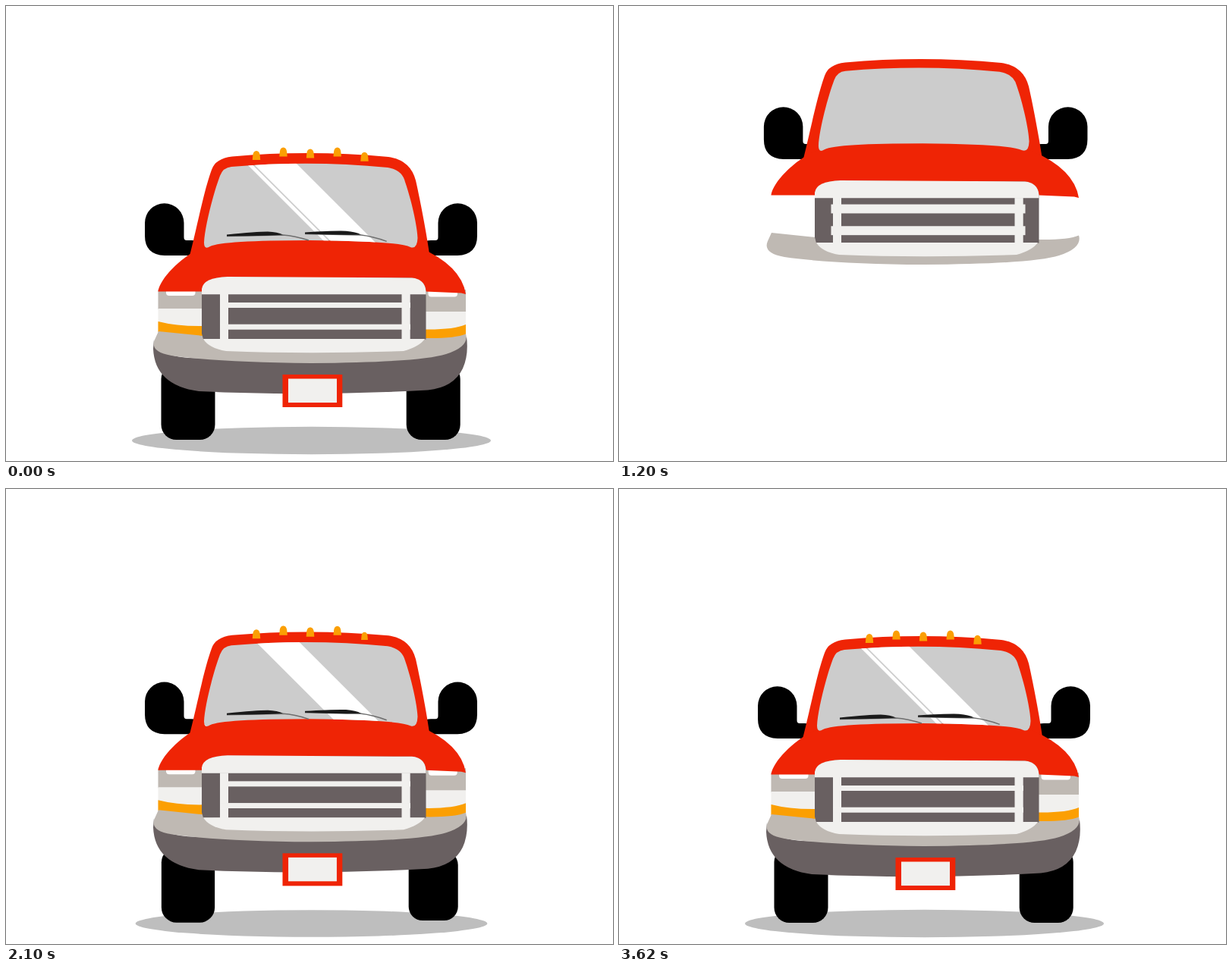
These frames come from a looping animation (800x600 px, 3.64 s). An HTML page without scripts:

```html
<!DOCTYPE html>
<html lang="en">
<head>
<meta charset="utf-8">
<title>Pickup truck</title>
<style>
html, body { margin: 0; width: 100%; height: 100%; overflow: hidden; background: #fff; }
svg { display: block; width: 800px; height: 600px; }

/* Every cycle starts 20 ms after load, so the finished truck shows first. */
svg [class] {
  animation: 3640ms ease-in-out -3620ms infinite;
  transform-box: fill-box;
  transform-origin: center;
}
svg .mid { animation-name: mid; animation-timing-function: step-end; }
svg .late { animation-name: late; animation-timing-function: step-end; }
svg .pop { animation-name: pop; animation-delay: calc(var(--s) * 1ms - 4368ms); }
svg .body { animation-name: drop, tilt; transform-box: view-box; transform-origin: 404px 510px; }
svg .shadow { animation-name: shadow; }
svg .wheel { animation-name: wheel; transform-origin: 50% 65%; }
svg .mirror { animation-name: mirror; }
svg .hood { animation-name: hood; }
svg .panel { animation-name: panel; }
svg .cab { animation-name: cab; }
svg .base { animation-name: base; }
svg .bar { animation-name: bar; }
svg .bumper { animation-name: bumper; }
svg .shine { animation-name: shine; }
svg .sliver { animation-name: sliver; }
svg .arm { animation-name: arm; }
svg .light { animation-name: light; animation-delay: calc(var(--i) * 60ms - 3620ms); transform-box: view-box; transform-origin: 0 0; }
svg .wheel.second { animation-delay: -3534ms; }
svg .mirror.second, svg .bar.second { animation-delay: -3520ms; }

@keyframes mid { 0% { visibility: hidden } 18.4%, 100% { visibility: visible } }
@keyframes late { 0% { visibility: hidden } 33.5%, 100% { visibility: visible } }
@keyframes pop { 0%, 20% { scale: 0 } 23% { scale: 1.1 } 26% { scale: .98 } 29%, 100% { scale: 1 } }
@keyframes drop {
  0%, 39% { translate: 0 -127px }
  45.8% { translate: 0 16.7px }
  54.7% { translate: 0 -7px }
  63.5% { translate: 0 1.2px }
  66.5% { translate: 0 1px }
  74%, 100% { translate: 0 0 }
}
@keyframes tilt {
  0%, 40% { rotate: 0deg }
  45.6% { rotate: -3deg }
  50.5% { rotate: .8deg }
  55%, 100% { rotate: 0deg }
}
@keyframes shadow {
  0%, 41.2% { scale: 0 }
  45.6% { scale: .99; animation-timing-function: ease-out }
  48.6% { scale: 1.085 }
  56.6% { scale: .98 }
  66.5% { scale: 1.003 }
  80%, 100% { scale: 1 }
}
@keyframes wheel {
  0%, 40.1% { scale: 0 }
  45.6% { scale: 1.57; animation-timing-function: ease-out }
  46.7% { scale: 1.65 }
  53.3% { scale: .88 }
  57.1% { scale: .99 }
  62.1% { scale: 1.02 }
  66.5%, 100% { scale: 1 }
}
@keyframes mirror {
  0%, 16% { scale: 0; translate: -84px 0 }
  19.8% { scale: 1.1; translate: -80px 0 }
  22% { scale: .98 }
  23.5% { scale: 1; translate: -80px 0 }
  31% { translate: 9px 0 }
  37.5% { translate: -2px 0 }
  42%, 100% { scale: 1; translate: 0 0 }
}
@keyframes hood { 0%, 4.4% { scale: 0 } 7.7% { scale: 1.02 } 10.5%, 100% { scale: 1 } }
@keyframes panel { 0%, 7.7% { scale: 0 } 11% { scale: 1.05 } 14%, 100% { scale: 1 } }
@keyframes cab {
  0%, 11% { scale: 0; translate: 0 -61px }
  14.6% { scale: 1.03 }
  18% { scale: 1 }
  21.5% { translate: 0 -61px }
  30.5% { translate: 0 5px }
  32.4% { translate: 0 3px }
  37%, 100% { scale: 1; translate: 0 0 }
}
@keyframes base {
  0%, 14.8% { scale: 0 1; translate: 0 19px }
  18.7% { scale: 1; translate: 0 0 }
  0%, 22% { d: path("M254 439H553Q553 449 553 457Q400 457 254 457Q254 448 254 439Z") }
  27%, 100% { d: path("M260 439H552Q545 449 524 455Q400 459.5 290 455Q267 451 260 439Z") }
  100% { scale: 1; translate: 0 0 }
}
@keyframes bar { 0%, 27.2% { scale: 0 } 29.7% { scale: 1.02 1.7 } 32.4%, 100% { scale: 1 } }
@keyframes bumper {
  0%, 25.8% { scale: 0; translate: 0 72px }
  28% { scale: .95 }
  32% { scale: 1; translate: 0 -3px }
  36.3%, 100% { scale: 1; translate: 0 0 }
}
@keyframes shine {
  0%, 39% { translate: -250px 0 }
  44.5% { translate: 22px 0 }
  57.1% { translate: 4px 0 }
  65%, 100% { translate: 0 0 }
}
@keyframes sliver { 0%, 57.7% { translate: -170px 0 } 64%, 100% { translate: 0 0 } }
@keyframes arm { 0%, 45.6% { stroke-width: 1.5px } 66.5%, 100% { stroke-width: 2.5px } }
@keyframes light {
  0%, 35.2% { scale: 0 }
  39% { scale: 1.75 }
  45.6% { scale: .9 }
  48.1% { scale: .8 }
  50.5% { scale: .85 }
  52.2% { scale: 1 }
  54.4% { scale: 1.03 }
  58.2%, 100% { scale: 1 }
}
</style>
</head>
<body>
<svg viewBox="0 0 800 600">
  <defs>
    <path id="glass" d="M261 312C262 290 274 245 282 224Q286 213 297 212Q400 203 503 213Q522 216 526 232C534 255 542 290 542.5 306Q542 321 533 318Q518 310 400 309Q285 309 269 317Q261 322 261 312Z"/>
    <clipPath id="pane"><use href="#glass"/></clipPath>
    <path id="mirror" d="M183 286A25.7 25.7 0 0 1 234.5 286V305Q234.5 309 238 309H244Q258 309 258 319T244 329H209Q183 328 183 303Z"/>
    <path id="lamp" d="M-5.2 0L-4.7 -6C-4.4 -10 -2.5 -12 0 -12S4.4 -10 4.7 -6L5.2 0Z"/>
    <g id="wiper">
      <path class="arm" fill="none" stroke="#6e6e6e" stroke-width="2.5" d="M291 303.5L365 302Q380 303 399 309"/>
      <path fill="#1a1a1a" d="M291 301.5Q330 297.5 345 297.5Q358 298 365 301.5Q345 303 318 303.2L291 303.5Z"/>
    </g>
  </defs>

  <ellipse class="shadow" cx="402.5" cy="573" rx="236.5" ry="18.2" fill="#bebebe"/>
  <g class="late">
    <rect class="wheel" x="204.5" y="472" width="71" height="100" rx="20"/>
    <rect class="wheel second" x="527.7" y="472" width="71" height="100" rx="20"/>
  </g>

  <g class="body">
    <g class="mirror"><use href="#mirror"/></g>
    <g class="mid">
      <g transform="translate(804) scale(-1 1)">
        <g class="mirror second"><use href="#mirror"/></g>
      </g>
    </g>

    <g class="late">
      <path class="pop" style="--s:1505" fill="#696061" d="M195 440Q195 460 240 464L402 470L560 462Q600 456 607 436Q610 460 602 478Q590 503 556 506.5Q400 515 254 508Q196 500 194 452Z"/>
      <g class="pop" style="--s:1340">
        <path fill="#bfb9b3" d="M200.5 374H260V400H200.5Z"/>
        <path fill="#f1f0ee" d="M200.5 399H260V430H200.5Z"/>
        <path fill="#fb9f03" d="M200.5 416Q225 422.5 260 422V437L200.5 430Z"/>
      </g>
      <g class="pop" style="--s:1390">
        <path fill="#bfb9b3" d="M552 374H606V404H552Z"/>
        <path fill="#f1f0ee" d="M552 403H606V430H552Z"/>
        <path fill="#fb9f03" d="M552 426.5Q590 427 606 420V434Q590 439 552 439Z"/>
      </g>
      <rect class="pop" style="--s:1800" x="211" y="371" width="38.5" height="11" rx="4" fill="#fff"/>
      <rect class="pop" style="--s:1840" x="556.5" y="372" width="38.5" height="11.5" rx="4" fill="#fff"/>
    </g>

    <path class="bumper" fill="#bfb9b3" d="M201 429L260 435L290 445H520L553 438Q592 438.5 606 432.5Q611 449 580 459Q545 470 402 471Q280 470 218 461Q189 456 196 440Z"/>

    <g fill="#ef2405">
      <path class="cab" d="M241 333C250 300 260 246 271 216Q276 201 298 198.5Q400 189.5 504 199Q533 203 540 230C546 256 557 315 559 334Q560 337 556 335Q551 333 545 335.5Q535 337 526 331Q512 325 400 325Q300 326 280 330Q274 332 265 332Q255 333 247 334Q241 335 241 333Z"/>
      <path class="hood" d="M200.5 376C204 356 240 322 272 313Q335 301 394 301.5Q470 301 544 318Q600 342 606 380L600 378.5L553 376.5H200.5Z"/>
    </g>

    <g class="mid"><g class="pop" style="--s:940"><use href="#glass" fill="#ccc"/></g></g>
    <g class="late" clip-path="url(#pane)" fill="#fff">
      <path class="shine" d="M318 200H375L495 320H438Z"/>
      <path class="sliver" d="M309 200H315.5L435.5 320H429Z"/>
    </g>
    <g class="late">
      <g class="pop" style="--s:1440"><use href="#wiper"/></g>
      <g class="pop" style="--s:1440"><use href="#wiper" transform="translate(103) rotate(2.3 365 302)"/></g>
    </g>

    <path class="panel" fill="#696061" d="M258 374Q260 358 292 357.5L534 358.5Q552 360 553.5 376V439.5H260L258 432Z"/>
    <g fill="#f1f0ee">
      <path class="base" d="M260 439H552Q545 449 524 455Q400 459.5 290 455Q267 451 260 439Z"/>
      <g class="mid">
        <path class="pop" style="--s:800" d="M258 380.3V373Q260 358 292 357L535 358.5Q552 360 553.5 376V380.3Z"/>
        <rect class="pop" style="--s:860" x="282" y="380" width="11" height="60"/>
        <rect class="pop" style="--s:900" x="521.5" y="380" width="11.2" height="60"/>
        <rect class="bar second" x="282" y="419.7" width="251" height="7"/>
        <rect class="bar" x="282" y="391" width="251" height="7" style="animation-delay:-3520ms"/>
      </g>
    </g>

    <g class="late">
      <rect class="pop" style="--s:1585" x="364.5" y="486" width="78.8" height="43" fill="#ef2405"/>
      <rect class="pop" style="--s:1800" x="372" y="491.5" width="64" height="31.5" fill="#f1f0ee"/>
    </g>

    <g class="late" fill="#fb9f03">
      <g transform="translate(330 203)"><use class="light" style="--i:0" href="#lamp"/></g>
      <g transform="translate(365.5 198.5)"><use class="light" style="--i:1" href="#lamp"/></g>
      <g transform="translate(401 200.5)"><use class="light" style="--i:2" href="#lamp"/></g>
      <g transform="translate(436.7 198.5)"><use class="light" style="--i:3" href="#lamp"/></g>
      <g transform="translate(472.5 204.7)"><use class="light" style="--i:4" href="#lamp"/></g>
    </g>
  </g>
</svg>
</body>
</html>
```
